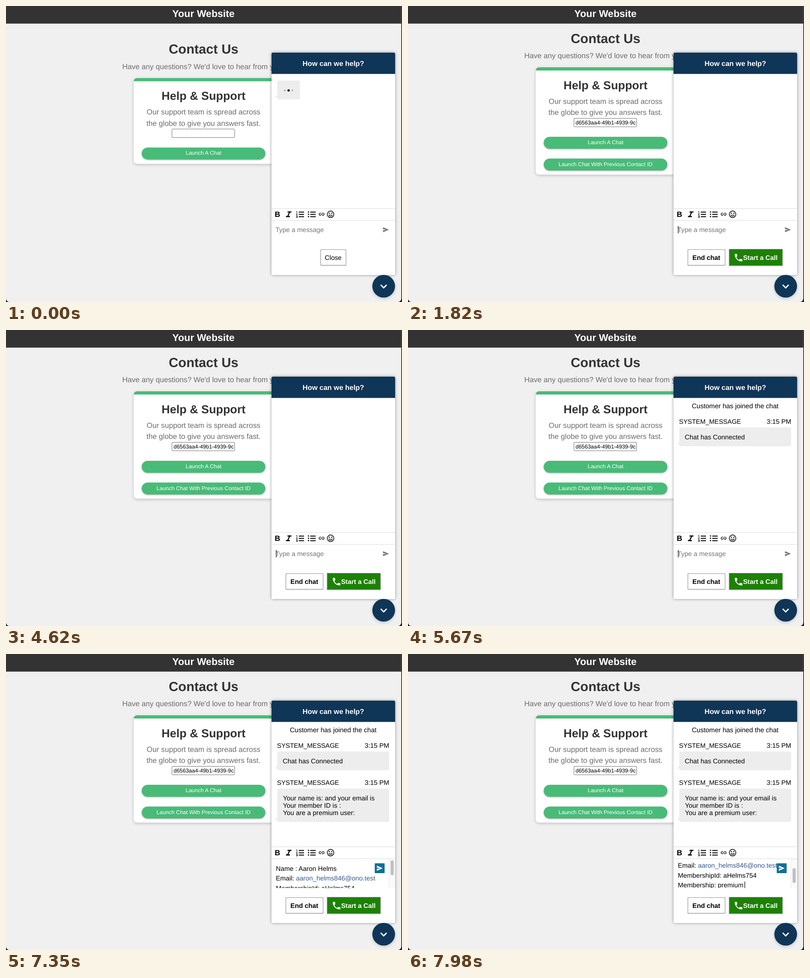
Write an HTML page that moves like this. It is 865x647 px and loops after 8000 ms.

```html
<!DOCTYPE html>
<html lang="en">
<head>
<meta charset="utf-8">
<title>Contact page chat</title>
<style>
  html, body { margin: 0; width: 100%; height: 100%; overflow: hidden; background: #222; }
  svg { display: block; width: 865px; height: 647px; }
  text {
    font: 14.4px "Liberation Sans", Arial, sans-serif;
    text-rendering: geometricPrecision;
    white-space: pre;
  }
  .mid { text-anchor: middle; }
  .end { text-anchor: end; }
  .bold { font-weight: 700; }
  .head { font-weight: 700; fill: #333; }
  .para { font-size: 16.2px; fill: #6c6c6c; }
  .small { font-size: 12px; }
  .white { fill: #fff; }
  .sys { font-size: 14.1px; }
  .hint { fill: #757575; }
  .link { fill: #34598f; }
  .green { fill: #48bb78; filter: drop-shadow(0 1px 1.5px #0005); }
  .card { filter: drop-shadow(0 2px 3px #0003); }
  .panel { filter: drop-shadow(0 0 3px #0006); }
  .button { fill: #fff; stroke: #999; filter: drop-shadow(0 1px 1px #0003); }
  .bubble { fill: #ededed; }
  .rule { stroke: #ddd; }
  .line { fill: none; stroke: #000; }
</style>
</head>
<body>
<svg viewBox="0 0 865 647">
  <defs>
    <clipPath id="inputClip"><rect x="363" y="246" width="134.5" height="18"/></clipPath>
    <clipPath id="editClip"><rect x="580" y="448" width="270" height="63.5"/></clipPath>
  </defs>

  <rect y="-10" width="863.5" height="657" rx="8" fill="#f0f0f0"/>
  <rect width="863.5" height="38.5" fill="#333"/>
  <text class="mid bold white" x="431.3" y="24" style="font-size:21.6px">Your Website</text>

  <g id="page">
    <text class="mid head" x="431.5" y="81" style="font-size:28.8px">Contact Us</text>
    <text class="para" x="254" y="114.3">Have any questions? We'd love to hear from you</text>
    <g class="card">
      <rect id="card" x="279" y="134" width="305.5" height="234.5" rx="7" fill="#fff"/>
      <path d="M279 141a7 7 0 0 1 7-7h291.500a7 7 0 0 1 7 7z" fill="#48bb78"/>
    </g>
    <text class="mid head" x="431.5" y="181.800" style="font-size:25.2px">Help &amp; Support</text>
    <text class="mid para" x="431.5" y="214">Our support team is spread across</text>
    <text class="mid para" x="431.5" y="238.3">the globe to give you answers fast.</text>
    <rect x="362.5" y="245.500" width="137" height="18.5" rx="1.500" fill="#fff" stroke="#767676"/>
    <rect class="green" x="296.5" y="286" width="270" height="26" rx="13"/>
    <text class="mid small white" x="431.5" y="302">Launch A Chat</text>
    <g id="contact">
      <text class="small" x="366" y="259" clip-path="url(#inputClip)">d6563aa4-49b1-4939-9c</text>
      <rect class="green" x="296.5" y="333.500" width="270" height="26" rx="13"/>
      <text class="mid small white" x="431.5" y="349.500">Launch Chat With Previous Contact ID</text>
    </g>
  </g>

  <rect class="panel" x="580" y="102" width="270" height="486" rx="3" fill="#fff"/>
  <path d="M580 148.500V105a3 3 0 0 1 3-3h264a3 3 0 0 1 3 3v43.500z" fill="#0f3557"/>
  <text class="mid bold white" x="715" y="131.300" style="font-size:15.5px">How can we help?</text>

  <g id="typing">
    <path class="bubble" d="M593 194v6l-5 0z"/>
    <rect class="bubble" x="592.5" y="163" width="49.5" height="41" rx="4"/>
    <circle cx="609" cy="184.500"/><circle cx="617.300" cy="184.500"/><circle cx="625.600" cy="184.500"/>
  </g>

  <g id="joined">
    <text class="mid" x="714.7" y="171" style="font-size:14.55px">Customer has joined the chat</text>
    <text class="sys" x="592" y="205">SYSTEM_MESSAGE</text>
    <text class="end" x="837" y="205">3:15 PM</text>
    <path class="bubble" d="M593 244v6l-5 0z"/>
    <rect class="bubble" x="592.5" y="213" width="244.5" height="41" rx="4"/>
    <text x="604.5" y="239">Chat has Connected</text>
  </g>

  <g id="reply">
    <text class="sys" x="592" y="286">SYSTEM_MESSAGE</text>
    <text class="end" x="837" y="286">3:15 PM</text>
    <path class="bubble" d="M593 357v6l-5 0z"/>
    <rect class="bubble" x="592.5" y="294" width="244.5" height="73" rx="4"/>
    <text x="605" y="320">Your name is: and your email is</text>
    <text x="605" y="336.200">Your member ID is :</text>
    <text x="605" y="352.400">You are a premium user:</text>
  </g>

  <g id="tools">
    <path class="rule" d="M580 442.500h270M580 468.500h270"/>
    <text class="bold" x="587" y="461" style="font-size:16.5px">B</text>
    <path d="M615 449h8.500v2.500h-3l-3.500 7.500h3v2.500h-8.500v-2.500h3l3.500-7.500h-3z"/>
    <path class="line" stroke-width="2" d="M639.500 450.500h11.500m-11.500 5h11.500m-11.500 5h11.500"/>
    <path class="line" d="M634 449h1.500v3.500M634 454h2.500l-2.500 3h3M634 459h2.500v3.500h-2.500m0-1.800h2.500"/>
    <path class="line" stroke-width="2" d="M664.500 450.500h12m-12 5h12m-12 5h12"/>
    <path d="M659.500 449h2.500v2.500h-2.500zm0 5h2.500v2.500h-2.500zm0 5h2.500v2.500h-2.500z"/>
    <path class="line" stroke-width="1.200" d="M688.500 452.500h-2a2.600 2.600 0 0 0 0 5.200h2m1.800-5.200h2a2.600 2.600 0 0 1 0 5.200h-2m-3.500-2.600h5.200"/>
    <circle class="line" cx="709" cy="455.300" r="7.200" stroke-width="1.500"/>
    <circle cx="706.300" cy="453" r="1.300"/><circle cx="711.700" cy="453" r="1.300"/>
    <path d="M704.500 456.500h9a4.600 4.600 0 0 1-9 0z"/>
    <path d="M706 457.500h6l-.7 1.300h-4.600z" fill="#fff"/>
  </g>

  <g id="empty">
    <text class="hint" x="588.700" y="494">Type a message</text>
    <path d="M823.500 483.500l13 5.500-13 5.500v-4.300l8-1.200-8-1.200z" fill="#757575"/>
    <rect id="caret" x="589.700" y="481" width="1.200" height="16"/>
  </g>

  <g id="edit" clip-path="url(#editClip)">
    <g id="draft">
      <text x="589.5" y="473.500">Name : Aaron Helms</text>
      <text x="589.5" y="495">Email: <tspan class="link">aaron_helms846@ono.test</tspan></text>
      <text x="589.5" y="516.600">MembershipId: aHelms754</text>
      <text x="589.5" y="538.200">Membership: premium</text>
      <rect x="735" y="525.500" width="1.200" height="16"/>
    </g>
    <rect x="805.500" y="457.500" width="21.500" height="21.500" rx="1" fill="#0f6f98"/>
    <path d="M810 462.500l13 5.700-13 5.700v-4.400l8-1.300-8-1.300z" fill="#fff"/>
    <rect x="836.500" y="448" width="13.500" height="64" fill="#fafafa"/>
    <path d="M836.500 448v64" stroke="#e8e8e8"/>
    <rect id="thumb" x="840" y="451" width="7" height="32.500" rx="3.500" fill="#c1c1c1"/>
  </g>

  <g id="close">
    <rect class="button" x="687.5" y="532.500" width="55" height="34"/>
    <text class="mid" x="714.7" y="554.500">Close</text>
  </g>
  <g id="actions">
    <rect class="button" x="611.5" y="532.500" width="81" height="34"/>
    <text class="mid bold" x="651.700" y="555">End chat</text>
    <rect class="button" x="701.5" y="531.500" width="116.500" height="36" style="fill:#1d8102"/>
    <path class="white" transform="translate(711 539) scale(.92)" d="M6.600 10.800c1.400 2.800 3.800 5.100 6.600 6.600l2.200-2.200c.3-.3.700-.4 1-.2 1.100.4 2.300.6 3.600.6.600 0 1 .4 1 1V20c0 .6-.4 1-1 1C10.600 21 3 13.400 3 4c0-.6.400-1 1-1h3.500c.6 0 1 .4 1 1 0 1.300.2 2.500.6 3.600.1.300 0 .7-.3 1z"/>
    <text class="bold white" x="732" y="555">Start a Call</text>
  </g>

  <circle class="card" cx="825" cy="612.500" r="24.800" fill="#0f3557"/>
  <path d="M818.500 609.500l6.500 6.500 6.500-6.500" fill="none" stroke="#fff" stroke-width="2.700"/>
</svg>

<script>
const LOOP = 8000, STEP = 70;
const LAUNCH = 1330, FOCUS = 1470, READY = 1820, JOIN = 5040;
const REPLY = 6510, PASTE = 6720, SCROLL = 7560;
const $ = id => document.getElementById(id);
const show = (id, on) => { $(id).style.display = on ? '' : 'none'; };
const moveY = (id, y) => $(id).setAttribute('transform', `translate(0 ${y})`);
const dots = document.querySelectorAll('#typing circle');

// Outer dots and the middle dot pulse in opposite phase.
function pulse(t) {
  const phase = (Math.floor(t / STEP) * STEP % 700) / 700;
  const outer = 1 - Math.abs(1 - 2 * phase);
  dots.forEach((dot, i) => {
    const k = i === 1 ? 1 - outer : outer;
    dot.setAttribute('r', 1.5 + k);
    dot.setAttribute('fill-opacity', 0.4 + 0.6 * k);
  });
}

function caretOn(t) {
  if (t >= 5600) return t < REPLY;
  return t >= FOCUS && (t - FOCUS) % 1050 < 490;
}

function draw(t) {
  const launched = t >= LAUNCH, focused = t >= FOCUS, pasted = t >= PASTE;
  moveY('page', launched ? 0 : 23.4);
  $('card').setAttribute('height', launched ? 234.5 : 187.5);
  show('contact', launched);
  show('typing', t < READY);
  pulse(t);
  show('close', !focused);
  show('actions', focused);
  show('joined', t >= JOIN);
  show('reply', t >= REPLY);
  moveY('tools', pasted ? -21 : 0);
  show('empty', !pasted);
  show('edit', pasted);
  show('caret', caretOn(t));

  const step = Math.max(0, Math.min(7, Math.floor((t - SCROLL) / STEP) + 1));
  const p = Math.sin(step / 7 * Math.PI / 2);
  moveY('draft', -28 * p);
  moveY('thumb', 17 * p);
}

function tick() {
  draw(performance.now() % LOOP);
  requestAnimationFrame(tick);
}
tick();
</script>
</body>
</html>
```
